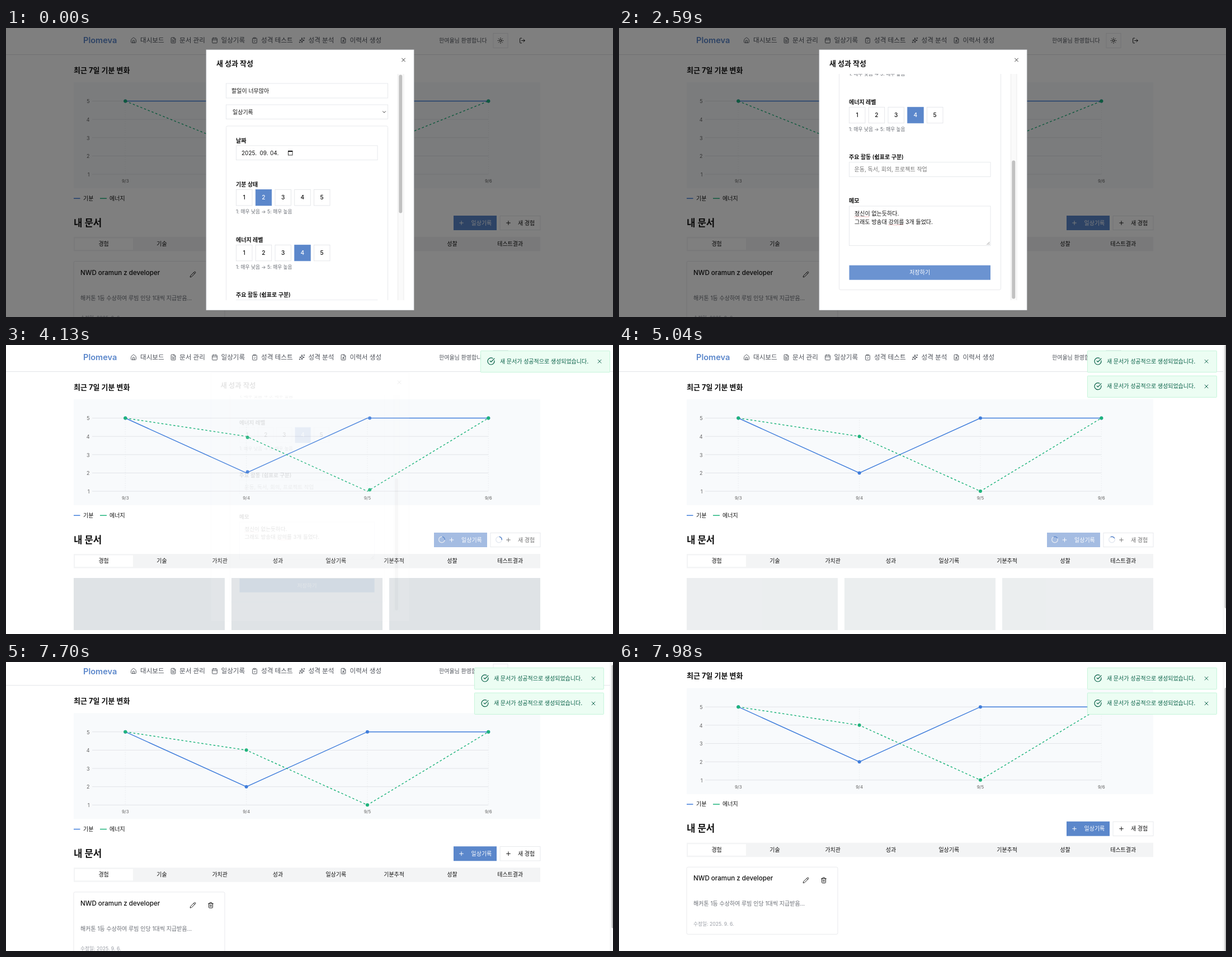
Recreate the animation shown at these times as an HTML page. Size 1085 px wide and 516 px high, loop 8000 ms.

```html
<!DOCTYPE html>
<html lang="ko">
<head>
<meta charset="utf-8">
<style>
html, body { margin: 0; width: 100%; height: 100%; overflow: hidden; background: #fff; }
svg { display: block; width: 1085px; height: 516px; font-family: Inter, 'Noto Sans CJK KR', 'Noto Sans CJK', sans-serif; }
</style>
</head>
<body>
<svg id="stage" viewBox="0 0 1085 516"></svg>
<script>
const LOOP = 8000, TICK = 70;
const SAVED = 4060, UNLOCKED = 4200, SECOND_TOAST = 4480, LOADED = 5530;
const BLUE = '#5b87cb', LINE = '#e2e4e8', GRAY = '#4f535b', INK = '#111';
const MOOD = '#3f7ddb', ENERGY = '#1fb47c';

const FILE = 'M15 2H6a2 2 0 0 0-2 2v16a2 2 0 0 0 2 2h12a2 2 0 0 0 2-2V7zM14 2v4a2 2 0 0 0 2 2h4';
const ICONS = {
  home: 'M15 21v-8a1 1 0 0 0-1-1h-4a1 1 0 0 0-1 1v8M3 10a2 2 0 0 1 .7-1.5l7-6a2 2 0 0 1 2.6 0l7 6a2 2 0 0 1 .7 1.5v9a2 2 0 0 1-2 2H5a2 2 0 0 1-2-2z',
  file: FILE + 'M10 9H8M16 13H8M16 17H8',
  calendar: 'M8 2v4M16 2v4M3 10h18M5 4h14a2 2 0 0 1 2 2v14a2 2 0 0 1-2 2H5a2 2 0 0 1-2-2V6a2 2 0 0 1 2-2',
  clipboard: 'M9 2h6v4H9zM16 4h2a2 2 0 0 1 2 2v14a2 2 0 0 1-2 2H6a2 2 0 0 1-2-2V6a2 2 0 0 1 2-2h2M9 14l2 2 4-4',
  sparkles: 'M12 3l2 7 7 2-7 2-2 7-2-7-7-2 7-2zM20 2v4M22 4h-4M4 17v4M6 19H2',
  resume: FILE + 'M15 18a3 3 0 1 0-6 0M14 13a2 2 0 1 1-4 0a2 2 0 0 1 4 0',
  sun: 'M12 2v2M12 20v2M4.9 4.9l1.4 1.4M17.7 17.7l1.4 1.4M2 12h2M20 12h2M6.3 17.7l-1.4 1.4M19.1 4.9l-1.4 1.4M16 12a4 4 0 1 1-8 0a4 4 0 0 1 8 0',
  logout: 'M9 21H5a2 2 0 0 1-2-2V5a2 2 0 0 1 2-2h4M16 17l5-5-5-5M21 12H9',
  pencil: 'M21.2 6.8a1 1 0 0 0-4-4L3.8 16.2a2 2 0 0 0-.5.8l-1.3 4.4a.5.5 0 0 0 .6.6l4.4-1.3a2 2 0 0 0 .8-.5zM15 5l4 4',
  trash: 'M3 6h18M19 6v14a2 2 0 0 1-2 2H7a2 2 0 0 1-2-2V6M8 6V4a2 2 0 0 1 2-2h4a2 2 0 0 1 2 2v2M10 11v6M14 11v6',
  check: 'M21.8 10A10 10 0 1 1 17 3.3M9 11l3 3L22 4',
  close: 'M18 6L6 18M6 6l12 12',
  plus: 'M5 12h14M12 5v14',
  chevron: 'M6 9l6 6 6-6',
};

const clamp = v => Math.max(0, Math.min(1, v));
const progress = (t, from, to) => clamp((t - from) / (to - from));
const mix = (a, b, p) => a + (b - a) * p;

// Texts are placed by the middle of their glyphs.
const text = (x, y, str, size = 10, fill = INK, weight = 400, anchor = 'start') =>
  `<text x="${x}" y="${y + size * .37}" font-size="${size}" fill="${fill}" font-weight="${weight}" text-anchor="${anchor}">${str}</text>`;
const rect = (x, y, w, h, fill, stroke = 'none', r = 0) =>
  `<rect x="${x}" y="${y}" width="${w}" height="${h}" fill="${fill}" stroke="${stroke}" stroke-width=".8" rx="${r}"/>`;
const path = (d, stroke, width = 1, extra = '') =>
  `<path d="${d}" fill="none" stroke="${stroke}" stroke-width="${width}" ${extra}/>`;
const icon = (name, x, y, size = 11.6, color = GRAY) =>
  `<g transform="translate(${x} ${y}) scale(${size / 24}) translate(-12 -12)">${path(ICONS[name], color, 2, 'stroke-linecap="round" stroke-linejoin="round"')}</g>`;
const group = (content, opacity, transform = '') =>
  `<g opacity="${opacity}" transform="${transform}">${content}</g>`;

function header() {
  const items = [
    ['home', 228, '대시보드', 240], ['file', 299, '문서 관리', 310], ['calendar', 373, '일상기록', 384.5],
    ['clipboard', 444.5, '성격 테스트', 456], ['sparkles', 529, '성격 분석', 540.5], ['resume', 603, '이력서 생성', 614.5],
  ];
  return text(138, 22, 'Plomeva', 14.6, BLUE, 600) +
    items.map(([name, ix, label, tx]) => icon(name, ix, 22) + text(tx, 22, label, 11.6, GRAY)).join('') +
    text(774, 22, '한여울님 환영합니다', 10, GRAY) +
    rect(871, 9.5, 26, 26, '#fff', LINE) + icon('sun', 884, 22.5, 11.6, INK) + icon('logout', 923, 22.5, 11.6, INK) +
    path('M0 47.5H1085', LINE);
}

function chart(t) {
  const left = 213.3, right = 862.3, valueY = v => 130.5 + (5 - v) * 32.65;
  const layout = values => values.map((v, i) => [mix(left, right, i / (values.length - 1)), valueY(v)]);
  const saved = t >= SAVED, move = progress(t, 4029, 4132);
  const days = saved ? [3, 4, 5, 6] : [3, 5, 6];
  const series = (before, after, color, dash) => {
    const from = layout(before), to = layout(after);
    const dots = saved ? to.map(([x, y], i) => {
      const [fx, fy] = from[i] || [x, y];
      return [mix(fx, x, move), mix(fy, y, move)];
    }) : from;
    return path('M' + (saved ? to : from).join('L'), color, 1.45, dash) +
      dots.map(([x, y]) => `<circle cx="${x}" cy="${y}" r="3" fill="${color}"/>`).join('');
  };
  let out = text(121, 75, '최근 7일 기분 변화', 13, INK, 700) + rect(121, 97, 834, 189, '#f8fafc', 'none', 1);
  for (let v = 1; v <= 5; v++)
    out += path(`M154 ${valueY(v)}H${right}`, LINE) + text(149.5, valueY(v) + .5, v, 9, '#666', 400, 'end');
  days.forEach((d, i) => {
    const x = mix(left, right, i / (days.length - 1));
    out += path(`M${x} 130V261`, '#eaecef', .8, 'stroke-dasharray="2 2"') + text(x, 273, '9/' + d, 8, '#666', 400, 'middle');
  });
  return out + series([5, 5, 5], [5, 2, 5, 5], MOOD, '') +
    series([5, 1, 5], [5, 4, 1, 5], ENERGY, 'stroke-dasharray="3.617"') +
    path('M121 304.3h11.5', MOOD, 1.5) + text(138, 304, '기분') +
    path('M168 304.3h12', ENERGY, 1.5) + text(185, 304, '에너지');
}

function spinner(x, t) {
  return `<circle cx="${x}" cy="347.5" r="5.3" fill="none" stroke="#e3e8f0" stroke-width="1.4"/>` +
    path(`M${x} 342.2a5.3 5.3 0 0 1 5.3 5.3`, BLUE, 1.5, `transform="rotate(${t * .36 - 40} ${x} 347.5)"`);
}

function documents(t) {
  const loading = t >= SAVED && t < LOADED, shift = loading ? -17.5 : 0;
  const tabs = ['경험', '기술', '가치관', '성과', '일상기록', '기분추적', '성찰', '테스트결과'];
  const main = rect(loading ? 765 : 800, 335, loading ? 95 : 77, 26, BLUE) +
    icon('plus', 814 + shift, 348, 11.6, '#fff') + text(831.5 + shift, 348, '일상기록', 10, '#fff', 500);
  const second = icon('plus', 898, 348, 11.6, INK) + text(915, 348, '새 경험', 10, INK, 500);
  let out = text(121, 347.5, '내 문서', 16.8, INK, 700) + group(main, loading ? .55 : 1) +
    rect(loading ? 866 : 883, 335.4, loading ? 89 : 72, 25.3, 'none', LINE) + group(second, loading ? .6 : 1) +
    rect(121, 373, 834, 25.5, '#f3f4f5') + rect(123, 375.5, 104, 20.5, '#fff') +
    tabs.map((label, i) => text(174.6 + i * 103.8, 385.5, label, 10, INK, 500, 'middle')).join('');
  if (loading) {
    const pulse = .8 + .2 * Math.cos((t - SAVED) / 1000 * Math.PI);
    return out + spinner(779, t) + spinner(881, t) +
      group([121, 403, 685].map(x => rect(x, 416, 270, 93, '#dfe3e6')).join(''), pulse);
  }
  return out + rect(121, 416.5, 270, 120, '#fff', LINE, 2.5) +
    text(133, 436.5, 'NWD oramun z developer', 11.6, INK, 500) +
    icon('pencil', 334, 440, 11.6, INK) + icon('trash', 366, 440, 11.6, INK) +
    text(133, 482, '해커톤 1등 수상하여 루빔 인당 1대씩 지급받음...', 10, '#6b6f76') +
    text(133, 518, '수정일: 2025. 9. 6.', 8.7, '#9a9ea6');
}

function scale(y, label, selected) {
  let out = text(411, y, label, 10, INK, 600) + text(411, y + 49, '1: 매우 낮음 → 5: 매우 높음', 8.7, '#6b6f76');
  for (let n = 1; n <= 5; n++) {
    const x = 411.5 + (n - 1) * 34.75, on = n === selected;
    out += rect(x, y + 9.5, 28.5, 28.5, on ? BLUE : '#fff', on ? BLUE : '#dfe1e5') +
      text(x + 14.2, y + 23.7, n, 10.2, on ? '#fff' : INK, 500, 'middle');
  }
  return out;
}

function modal(t) {
  const rest = 1 - progress(t, 770, 1050), scrolled = 1 - rest * rest, hover = progress(t, 2380, 2590);
  const squiggle = (x, y, w) => path(`M${x} ${y}h${w}`, '#e58a8a', 1, 'stroke-dasharray="1.5 1.2"');
  const button = `rgb(${mix(91, 107, hover)},${mix(135, 147, hover)},${mix(203, 209, hover)})`;
  const form = rect(393.5, 99, 289, 26, '#fff', LINE) + text(403, 112, '할일이 너무많아') +
    rect(393.5, 137, 289, 25.5, '#fff', LINE) + text(405, 150, '일상기록') + icon('chevron', 676, 150, 10, INK) +
    rect(393.5, 175, 289, 538.5, '#fff', LINE, 2.5) +
    text(411, 201, '날짜', 10, INK, 600) + rect(411.5, 210, 252.5, 25.7, '#fff', LINE) +
    text(421, 223, '2025.') + text(453.5, 223, '09.') + text(472, 223, '04.') +
    rect(504.5, 219.5, 7.5, 7.5, 'none', INK) + rect(504.5, 219, 7.5, 2, INK) +
    scale(279, '기분 상태', 2) + scale(377.8, '에너지 레벨', 4) +
    text(411, 476.3, '주요 활동 (쉼표로 구분)', 10, INK, 600) + rect(411.5, 485.7, 252.5, 25.7, '#fff', LINE) +
    text(420.5, 498.5, '운동, 독서, 회의, 프로젝트 작업', 10, '#757575') +
    text(411, 554.5, '메모', 10, INK, 600) + rect(411.5, 564, 252.5, 70.5, '#fff', LINE) +
    text(421, 577.5, '정신이 없는듯하다.') + text(421, 592, '그래도 방송대 강의를 3개 들었다.') +
    squiggle(421, 583, 27) + squiggle(482, 597.5, 27) +
    path('M657.5 633l5-5M660.5 633l2-2', '#777', .8) +
    rect(411.5, 669.7, 252.5, 26, button) + text(537.7, 682.6, '저장하기', 10, '#fff', 500, 'middle');
  const closing = progress(t, 4025, 4142), zoom = 1 - closing * .05;
  const dim = .5 * (1 - progress(t, 4025, 4120));
  return rect(0, 0, 1085, 516, `rgba(0,0,0,${dim})`) + group(
    rect(358, 39, 371, 464.5, '#fff', LINE) + text(376, 63, '새 성과 작성', 13, INK, 700) +
    icon('close', 710.5, 57, 11.6, '#333') +
    '<clipPath id="view"><rect x="376" y="82" width="340" height="404"/></clipPath>' +
    `<g clip-path="url(#view)"><g transform="translate(0 ${-246 * scrolled})">${form}</g></g>` +
    rect(700, 82, 11, 404, '#fafafa') + path('M700.5 82v404M711 82v404', '#e8e8e8', .8) +
    rect(702.3, 83.5 + 153 * scrolled, 6, 247, '#c1c1c1', 'none', 3),
    1 - closing, `translate(543.5 271) scale(${zoom}) translate(-543.5 -271)`);
}

function toast(x, y, opacity = 1) {
  const green = '#065f46';
  return group(rect(.4, .4, 231, 38.3, '#ecfdf3', '#b9f3d2', 1) + icon('check', 19, 19, 14.5, green) +
    text(35, 19, '새 문서가 성공적으로 생성되었습니다.', 10, green, 500) + icon('close', 213, 19.3, 11.6, green),
    opacity, `translate(${x} ${y})`);
}

function scene(t) {
  const p = progress(t, 7625, 7980), scroll = 50.3 * p * p * (3 - 2 * p);
  const unlocked = t >= UNLOCKED, toastX = unlocked ? 837 : 848;
  let out = rect(0, 0, 1085, 516, '#fff') + group(header() + chart(t) + documents(t), 1, `translate(0 ${-scroll})`);
  if (unlocked)
    out += rect(1080, 0, 5, 516, '#fafafa') + path('M1080 0V516', '#ececec', .8) + rect(1082.5, scroll * .915, 5, 470, '#c1c1c1', 'none', 2);
  if (t >= SAVED) out += toast(toastX, 10);
  if (t >= SECOND_TOAST) out += toast(toastX, 54.7, t < SECOND_TOAST + TICK ? .6 : 1);
  // The fading backdrop lies over the first toast.
  return unlocked ? out : out + modal(t);
}

const stage = document.getElementById('stage');
let shown = -1;
function draw() {
  const t = Math.floor(performance.now() % LOOP / TICK) * TICK;
  if (t !== shown) stage.innerHTML = scene(shown = t);
  requestAnimationFrame(draw);
}
draw();
</script>
</body>
</html>
```
